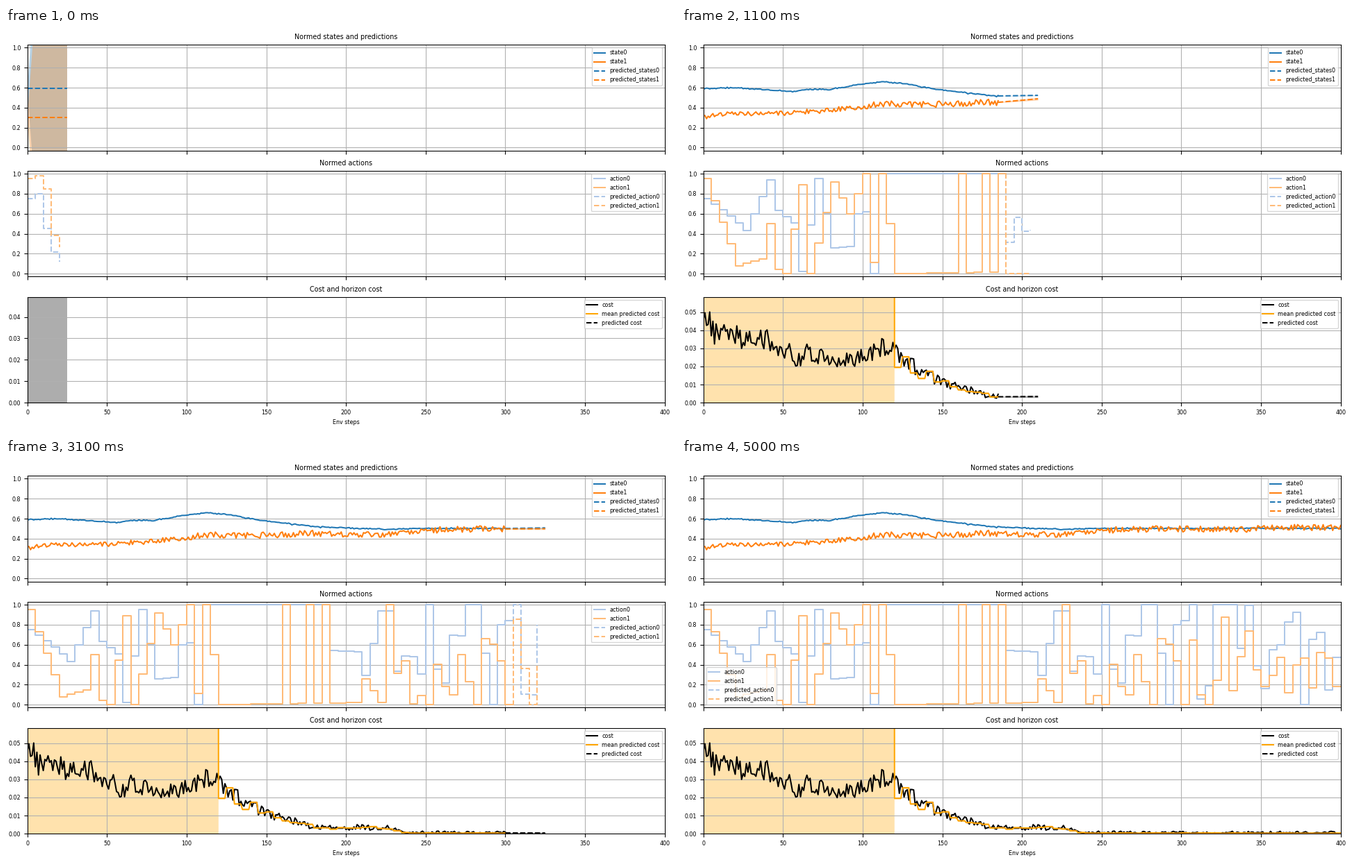
A matplotlib script for the animation above (5100 ms loop, 964x581 px).

```python
import numpy as np
import matplotlib.pyplot as plt
from matplotlib.animation import FuncAnimation
from matplotlib.ticker import MultipleLocator

W, H, DPI = 964, 581, 128
K = 96.4 / DPI            # scales the usual point sizes to this dpi
TOTAL, HORIZON, BLOCK = 400, 25, 5
WARMUP, SATURATED_END, SETTLED = 120, 190, 225
BAND_ALPHA = 0.32

plt.rcParams.update({
    "font.family": "DejaVu Sans", "font.size": 6 * K,
    "lines.linewidth": 1.5 * K, "patch.linewidth": K,
    "axes.linewidth": 0.8 * K, "grid.linewidth": 0.8 * K,
    "axes.titlepad": 6 * K, "axes.labelpad": 4 * K,
})
for side in ("xtick", "ytick"):
    plt.rcParams.update({f"{side}.major.size": 3.5 * K,
                         f"{side}.major.pad": 3.5 * K,
                         f"{side}.major.width": 0.8 * K})

TAB = plt.get_cmap("tab20").colors
STATE_COLORS = TAB[0], TAB[2]
ACTION_COLORS = TAB[1], TAB[3]

# ---- data -------------------------------------------------------------
rng = np.random.default_rng(4)
steps = np.arange(TOTAL + 1)
starts = np.arange(0, TOTAL, BLOCK)


def curve(x, *points):
    """Piecewise linear curve through (x, y) key points."""
    return np.interp(x, *zip(*points))


# states: slow drift towards 0.5 plus sensor noise
trends = [
    curve(steps, (0, .59), (20, .6), (57, .56), (65, .582), (80, .583),
          (95, .625), (113, .66), (130, .63), (145, .586), (180, .52),
          (225, .492), (240, .5), (400, .505)),
    curve(steps, (0, .3), (10, .335), (50, .345), (80, .372), (110, .435),
          (160, .435), (180, .455), (222, .44), (250, .485), (285, .5),
          (330, .49), (370, .51), (400, .508)),
]
wobble = curve(steps, (0, .02), (60, .025), (110, .032), (400, .032))
states = [trends[0] + rng.normal(0, .003, TOTAL + 1),
          trends[1] + wobble * rng.uniform(-1, 1, TOTAL + 1)]

# cost: noise grows with the level
cost_level = curve(steps, (0, .048), (8, .037), (42, .034), (60, .024),
                   (65, .029), (85, .022), (115, .031), (130, .021),
                   (150, .011), (160, .0095), (180, .0035), (225, .0035),
                   (237, .0004), (400, .0003))
cost = np.abs(cost_level + (.16 * cost_level + .001)
              * rng.uniform(-1, 1, TOTAL + 1))

# the model's mean is huge until the warm-up ends, then follows each block
block_mean = cost_level[:-1].reshape(-1, BLOCK).mean(axis=1)
block_mean *= rng.uniform(.7, 1.2, len(starts))
mean_cost = np.where(steps < WARMUP, 1, np.append(block_mean, block_mean[-1])[steps // BLOCK])
mean_std = np.where(steps < WARMUP, 3, .0005)

# actions: exploration, saturation with pulses, then random corrections
actions = np.array([
    curve(starts, (0, .75), (15, .58), (25, .43), (40, .94), (45, .63),
          (55, .51), (60, .02), (70, .95), (80, .26), (90, .27), (95, .6),
          (100, .62), (105, 0), (110, 1), (185, 1), (190, .54), (205, .53),
          (210, .29), (220, .94)),
    curve(starts, (0, .95), (20, .08), (35, .15), (40, .5), (45, .04),
          (50, 0), (60, .89), (65, 0), (80, .92), (90, .6), (100, 1),
          (105, .11), (110, 1), (120, 0), (205, .02), (210, .26), (220, .02)),
])
for pulse in (160, 175, 185, 225):
    actions[1, pulse // BLOCK] = 1
late = starts > SETTLED
for row, level, sigma in zip(actions, (.57, .3), (.32, .32)):
    row[late] = np.clip(rng.normal(level, sigma, late.sum()), 0, 1)

# one control step per frame, with some steps passed over
jumps = [0, WARMUP] + [5] * 5 + [10, 5] * 5 + [5] * 7 + [10] + [5] * 26
times = np.cumsum(jumps)
LAST = times[-1]


def plan(t):
    """Current action and four planned ones, for both actions."""
    now = t // BLOCK
    cols = np.minimum(np.arange(now, now + 5), len(starts) - 1)
    planned = actions[:, cols]
    if not WARMUP <= t < SATURATED_END - HORIZON:
        noise = np.random.default_rng(t).uniform(-.4, .4, (2, 4))
        planned[:, 1:] = np.clip(planned[:, 1:] + noise, 0, 1)
    return planned


def spread(t):
    """Band half-widths at the horizon for state0, state1 and cost."""
    u = np.random.default_rng(t + 1).uniform(0, 1, 3)
    return u * np.array([.015, .045, .0015]) * min(1, (t / SETTLED) ** 4)


# ---- figure -----------------------------------------------------------
fig = plt.figure(figsize=(W / DPI, H / DPI), dpi=DPI, facecolor="white")
LEFT, RIGHT, TOP, HEIGHT, PITCH = 30.7, 947.7, 24.1, 152.6, 181.75
axes = []
for i, title in enumerate(("Normed states and predictions", "Normed actions",
                           "Cost and horizon cost")):
    bottom = TOP + i * PITCH + HEIGHT
    ax = fig.add_axes([LEFT / W, 1 - bottom / H,
                       (RIGHT - LEFT) / W, HEIGHT / H])
    ax.set(title=title, xlim=(0, TOTAL), ylim=(-.03, 1.03))
    ax.xaxis.set_major_locator(MultipleLocator(50))
    ax.yaxis.set_major_locator(MultipleLocator(.2))
    ax.grid(True)
    axes.append(ax)
ax_state, ax_action, ax_cost = axes
for ax in axes[:2]:
    ax.tick_params(labelbottom=False)
ax_cost.yaxis.set_major_locator(MultipleLocator(.01))
ax_cost.set_xlabel("Env steps")


def add_lines(ax, labels, colors, style="-", **kw):
    return [ax.plot([], [], style, color=c, label=name, **kw)[0]
            for name, c in zip(labels, colors)]


STEP = {"drawstyle": "steps-post"}
state_lines = add_lines(ax_state, ("state0", "state1"), STATE_COLORS)
state_preds = add_lines(ax_state, ("predicted_states0", "predicted_states1"),
                        STATE_COLORS, "--")
action_lines = add_lines(ax_action, ("action0", "action1"), ACTION_COLORS, **STEP)
action_preds = add_lines(ax_action, ("predicted_action0", "predicted_action1"),
                         ACTION_COLORS, "--", **STEP)
cost_line, mean_line = add_lines(ax_cost, ("cost", "mean predicted cost"),
                                 ("black", "orange"))
cost_pred, = add_lines(ax_cost, ("predicted cost",), ("black",), "--")

ax_state.legend(loc="upper right")
ax_cost.legend(loc="upper right")
action_legend = ax_action.legend(loc="upper right")
bands = []


def add_band(ax, x, mid, half, color):
    bands.append(ax.fill_between(x, mid - half, mid + half, color=color,
                                 alpha=BAND_ALPHA, linewidth=0))


def draw_history(t):
    end = TOTAL if t == LAST else t
    n = end + 1 if t else 0
    for line, values in zip(state_lines, states):
        line.set_data(steps[:n], values[:n])
    cost_line.set_data(steps[:n], cost[:n])
    mean_line.set_data(steps[:n], mean_cost[:n])
    if n:
        add_band(ax_cost, steps[:n], mean_cost[:n], mean_std[:n], "orange")

    blocks = t // BLOCK + 1 if t else 0
    for line, values in zip(action_lines, actions):
        done = values[:blocks]
        line.set_data(np.arange(blocks + 1) * BLOCK if blocks else [],
                      np.r_[done, done[-1:]])


def draw_prediction(t):
    if t == LAST:
        for line in (*state_preds, *action_preds, cost_pred):
            line.set_data([], [])
        return
    untrained = t == 0
    u = np.linspace(0, 1, HORIZON + 1)
    x = t + u * HORIZON
    width = spread(t)

    for i, line in enumerate(state_preds):
        first = trends[i][t]
        pull = 0 if untrained else (.006, .75 * (.5 - first))[i]
        mid = first + pull * u
        half = .22 * (x - t) if untrained else width[i] * np.sqrt(u)
        line.set_data(x, mid)
        add_band(ax_state, x, mid, half, STATE_COLORS[i])

    for line, values in zip(action_preds, plan(t)):
        line.set_data(t + np.arange(5) * BLOCK, values)

    if untrained:
        mid, half = np.ones_like(x), 3
    else:
        first = mean_cost[t]
        final = (first + cost_level[min(t + HORIZON, TOTAL)]) / 2
        mid, half = first + (final - first) * u, width[2] * np.sqrt(u)
    cost_pred.set_data(x, mid)
    add_band(ax_cost, x, mid, half, "black")


def update(frame):
    t = int(times[frame])
    while bands:
        bands.pop().remove()
    draw_history(t)
    draw_prediction(t)
    ax_cost.set_ylim(0, .0584 if t else .04935)
    action_legend.set_loc("upper right" if t < 335 else
                          "lower right" if t < 375 else "lower left")
    return []


anim = FuncAnimation(fig, update, frames=len(times), interval=100,
                     repeat=True, repeat_delay=0, blit=False)
plt.show()
```
